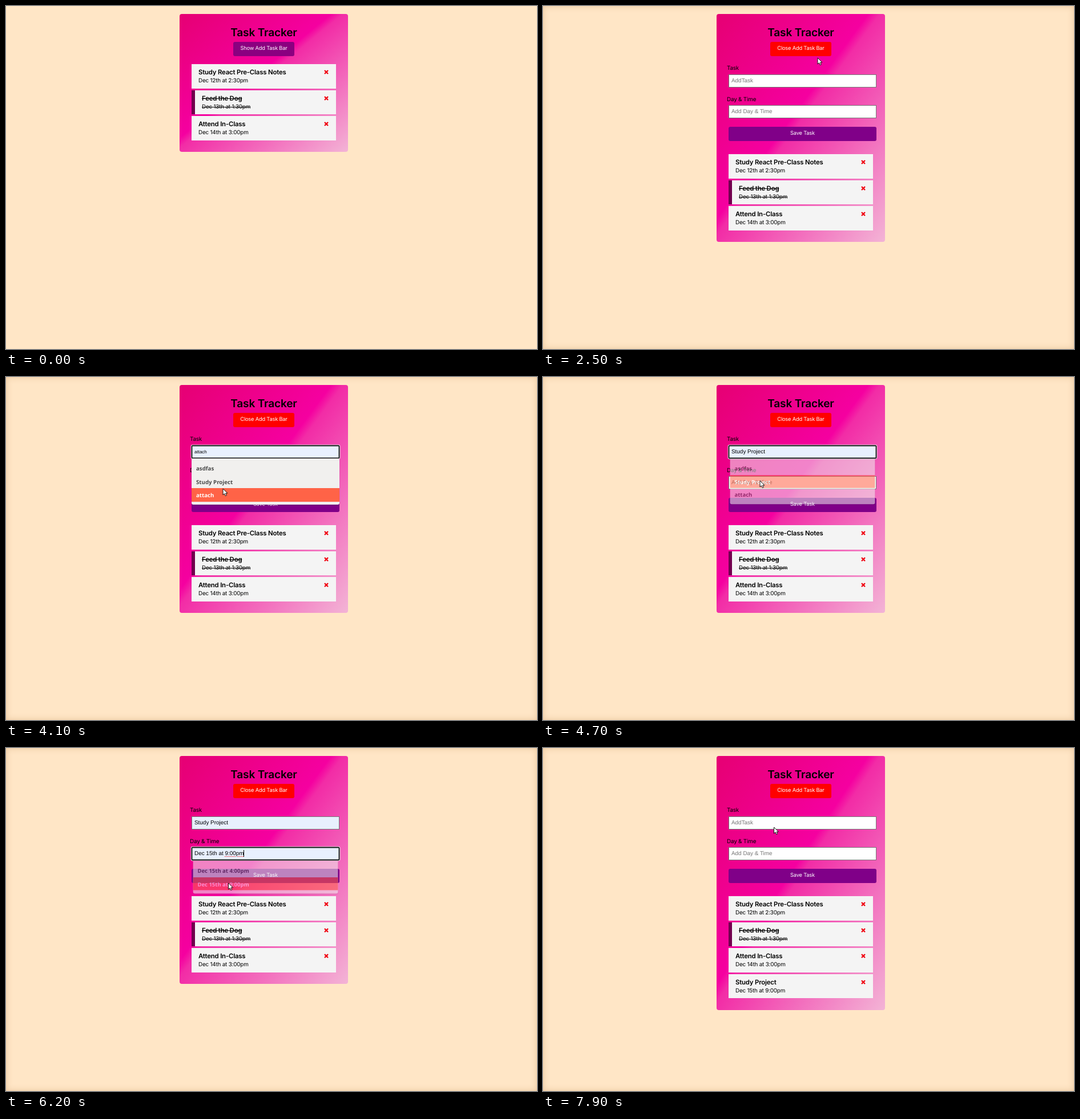
Animation, 930 px wide and 602 px high, one loop 8000 ms. Source, as an HTML page:

```html
<!DOCTYPE html>
<html lang="en">
<head>
<meta charset="utf-8">
<title>Task Tracker</title>
<style>
  html, body { margin: 0; width: 100%; height: 100%; overflow: hidden; background: #ffe6c6; }
  #stage {
    position: relative; width: 930px; height: 602px; overflow: hidden;
    font: 9.9px Inter, sans-serif; letter-spacing: -.02em; font-optical-sizing: none;
    text-rendering: geometricPrecision; white-space: nowrap; color: #000;
  }
  #stage div, #stage svg { position: absolute; box-sizing: border-box; }
  #card {
    left: 304px; top: 14px; width: 295px; height: 242px; border-radius: 4px;
    background: linear-gradient(to bottom right, #e60073, #f500a0 45%, #f22ca6 48.5%, #f3b4d6);
  }
  .open #card { height: 400px; }
  .open.saved #card { height: 446px; }
  #head { left: 304px; width: 295px; top: 33.5px; line-height: 24px; text-align: center; font-size: 19.1px; font-weight: 600; }
  .btn { color: #fff; border-radius: 3px; text-align: center; font-size: 9.3px; line-height: 23.5px; }
  #toggle { left: 398px; top: 63px; width: 107px; height: 25px; background: #8b0080; }
  .open #toggle { background: #f00; }
  #save { left: 325px; top: 212px; width: 259px; height: 25px; background: #800088; }
  #form, #added { display: none; }
  .open #form, .saved #added { display: block; }
  .label { left: 322px; line-height: 16px; }
  .field {
    left: 325px; width: 259px; height: 23px; padding-left: 4px;
    border: 1px solid #767676; background: #fff; color: #757575;
    font: 9.92px/21px "Liberation Sans", Arial, sans-serif; letter-spacing: 0;
  }
  .field.fill { background: #e8f0fe; color: #000; }
  .field.hint { font-size: 8px; }
  .field.focus {
    border-color: #101010; border-radius: 2px;
    box-shadow: inset 0 0 0 .4px #101010, 0 0 0 .5px #101010, 0 0 0 1.3px #fff;
  }
  .typo { text-decoration: underline dotted #e00 1px; text-underline-offset: 2px; }
  .caret { display: inline-block; width: 1px; height: 12px; background: #000; vertical-align: -2.5px; }
  .pop {
    left: 325px; width: 259px; padding: 5.3px 0; background: #f1f0ee; border-radius: 0 0 3px 3px;
    box-shadow: 0 1px 2px rgba(0,0,0,.18); letter-spacing: 0;
    font: 600 9.7px "Noto Sans", sans-serif; color: #4a4a4a;
  }
  .pop p { margin: 0; padding-left: 8px; height: 23.6px; line-height: 25px; }
  .pop p.on { background: #ff6347; color: #fff; }
  #list { left: 325px; top: 102px; }
  .open #list { top: 260px; }
  .task { width: 253px; height: 42.6px; background: #f4f4f4; }
  .task div { left: 12px; }
  .task .name { top: 5.3px; line-height: 18px; font-size: 11.4px; font-weight: 600; }
  .task .when { top: 21.3px; line-height: 16px; }
  .task svg { right: 13.5px; top: 10.4px; width: 8px; height: 8px; stroke: #f0000f; stroke-width: 2.3; }
  .task.done { border-left: 6px solid #72004e; }
  .task.done div { text-decoration: line-through; }
  #glow { inset: 0; box-shadow: inset 0 0 11px 1px rgba(170,105,40,.22); }
  #cursor { left: 0; top: 0; overflow: visible; fill: #fff; stroke: #000; stroke-width: .9; stroke-linejoin: round; }
</style>
</head>
<body>
<div id="stage">
  <div id="card"></div>
  <div id="head">Task Tracker</div>
  <div id="toggle" class="btn"></div>
  <div id="form">
    <div class="label" style="top:100.5px">Task</div>
    <div id="task" class="field" style="top:120px"></div>
    <div class="label" style="top:155.5px">Day &amp; Time</div>
    <div id="day" class="field" style="top:174px"></div>
    <div id="save" class="btn">Save Task</div>
  </div>
  <div id="list"></div>
  <div id="taskPop" class="pop" style="top:143px"><p>asdfas</p><p>Study Project</p><p>attach</p></div>
  <div id="dayPop" class="pop" style="top:198px"><p>Dec 15th at 4:00pm</p><p>Dec 15th at 9:00pm</p></div>
  <div id="glow"></div>
  <svg id="cursor">
    <path id="arrow" d="M0 0V11L2.6 8.7 4.3 12.6 6.3 11.7 4.6 8H8Z"/>
    <path id="hand" d="M-1.2 .8Q0-.6 1.1 .8V4.2L5 5.2Q6 5.6 5.8 6.8L4.8 11H-.8L-3.6 7Q-3.4 5.8-2.2 6.4L-1.2 7.2Z"/>
    <path id="beam" d="M-2.5-5Q0-5 0-4Q0-5 2.5-5M0-4V4M-2.5 5Q0 5 0 4Q0 5 2.5 5M-1.2 1H1.2" fill="none" stroke-width="1.2"/>
  </svg>
</div>
<script>
const $ = id => document.getElementById(id);
const LOOP = 8000, STEP = 100, ROW = 23.6;

// When each action happens, in ms
const at = {
  enter: 300, open: 1500, taskFocus: 2800, taskPop: 2900, taskPick: 4700,
  dayFocus: 5400, dayPop: 5500, dayPick: 6200, save: 6700
};

// Pointer moves: start, end, and where it comes to rest
const start = [740, 168];
const moves = [
  [300, 600, 404, 112],
  [800, 1200, 463, 75],
  [1800, 2500, 481, 91],
  [2500, 2900, 400, 131],
  [3500, 4000, 380, 196],
  [4200, 4400, 380, 182],
  [4800, 5200, 382, 189],
  [5500, 5900, 389.5, 237],
  [6200, 6500, 399, 205],
  [7500, 7900, 404.5, 139]
];

const tasks = [
  ['Study React Pre-Class Notes', 'Dec 12th at 2:30pm'],
  ['Feed the Dog', 'Dec 13th at 1:30pm', 'done'],
  ['Attend In-Class', 'Dec 14th at 3:00pm'],
  ['Study Project', 'Dec 15th at 9:00pm']
];
$('list').innerHTML = tasks.map(([name, when, cls = ''], i) =>
  `<div class="task ${cls}" style="top:${i * 45.5}px"><div class="name">${name}</div>` +
  `<div class="when">${when}</div><svg><path d="M1 1L7 7M7 1L1 7"/></svg></div>`).join('');
$('list').lastChild.id = 'added';

const clamp = v => Math.min(1, Math.max(0, v));
const within = (t, a, b) => t >= a && t < b;
const ramp = (t, from) => clamp((t - from + STEP) / 220);
const popAlpha = (t, name) => ramp(t, at[name + 'Pop']) * (1 - ramp(t, at[name + 'Pick']));

function pointer(t) {
  let [x, y] = start;
  for (const [from, to, tx, ty] of moves) {
    const k = clamp((t - from) / (to - from)), ease = k * k * (3 - 2 * k);
    x += (tx - x) * ease;
    y += (ty - y) * ease;
  }
  return [x, y];
}

function hit(id, x, y) {
  const { offsetLeft: l, offsetTop: top, offsetWidth: w, offsetHeight: h } = $(id);
  return within(x, l, l + w) && within(y, top, top + h);
}

// The shape trails the pointer by one step
function cursorKind(t) {
  if (t < at.enter) return '';
  const [x, y] = pointer(t - STEP), over = id => hit(id, x, y);
  if (['task', 'day'].some(name => popAlpha(t, name) && over(name + 'Pop'))) return 'arrow';
  if (over('toggle') || over('save')) return 'hand';
  return over('task') || over('day') ? 'beam' : 'arrow';
}

// Draws the suggestions and returns the text under the pointer
function drawPop(t, name) {
  const pop = $(name + 'Pop'), alpha = popAlpha(t, name);
  const row = alpha ? Math.floor((pointer(t)[1] - pop.offsetTop - 5) / ROW) : -1;
  pop.style.opacity = alpha;
  pop.style.transform = `scale(${alpha < .9 ? .98 : 1})`;
  [...pop.children].forEach((p, i) => p.classList.toggle('on', i === row));
  return pop.children[row]?.textContent;
}

function drawField(t, name, hint, value, blur) {
  const field = $(name), preview = drawPop(t, name);
  const typed = within(t, at[name + 'Pick'], at.save) && value;
  field.innerHTML = typed || preview || hint;
  field.classList.toggle('fill', !!(typed || preview));
  field.classList.toggle('hint', !typed && !!preview);
  field.classList.toggle('focus', within(t, at[name + 'Focus'], blur));
}

function draw(now) {
  const t = Math.floor(now % LOOP / STEP) * STEP, open = t >= at.open;
  $('stage').classList.toggle('open', open);
  $('stage').classList.toggle('saved', t >= at.save);
  $('toggle').textContent = (open ? 'Close' : 'Show') + ' Add Task Bar';
  drawField(t, 'task', 'AddTask', 'Study Project', at.dayFocus);
  drawField(t, 'day', 'Add Day &amp; Time',
    'Dec 15th at <span class="typo">9:00pm</span><span class="caret"></span>', at.save);
  $('glow').style.opacity = clamp((t - 200) / 900);

  const kind = cursorKind(t), [x, y] = pointer(t);
  for (const id of ['arrow', 'hand', 'beam']) $(id).style.display = id === kind ? '' : 'none';
  $('cursor').style.transform = `translate(${x}px, ${y}px)`;
}

function tick() {
  draw(performance.now());
  requestAnimationFrame(tick);
}
tick();
</script>
</body>
</html>
```
